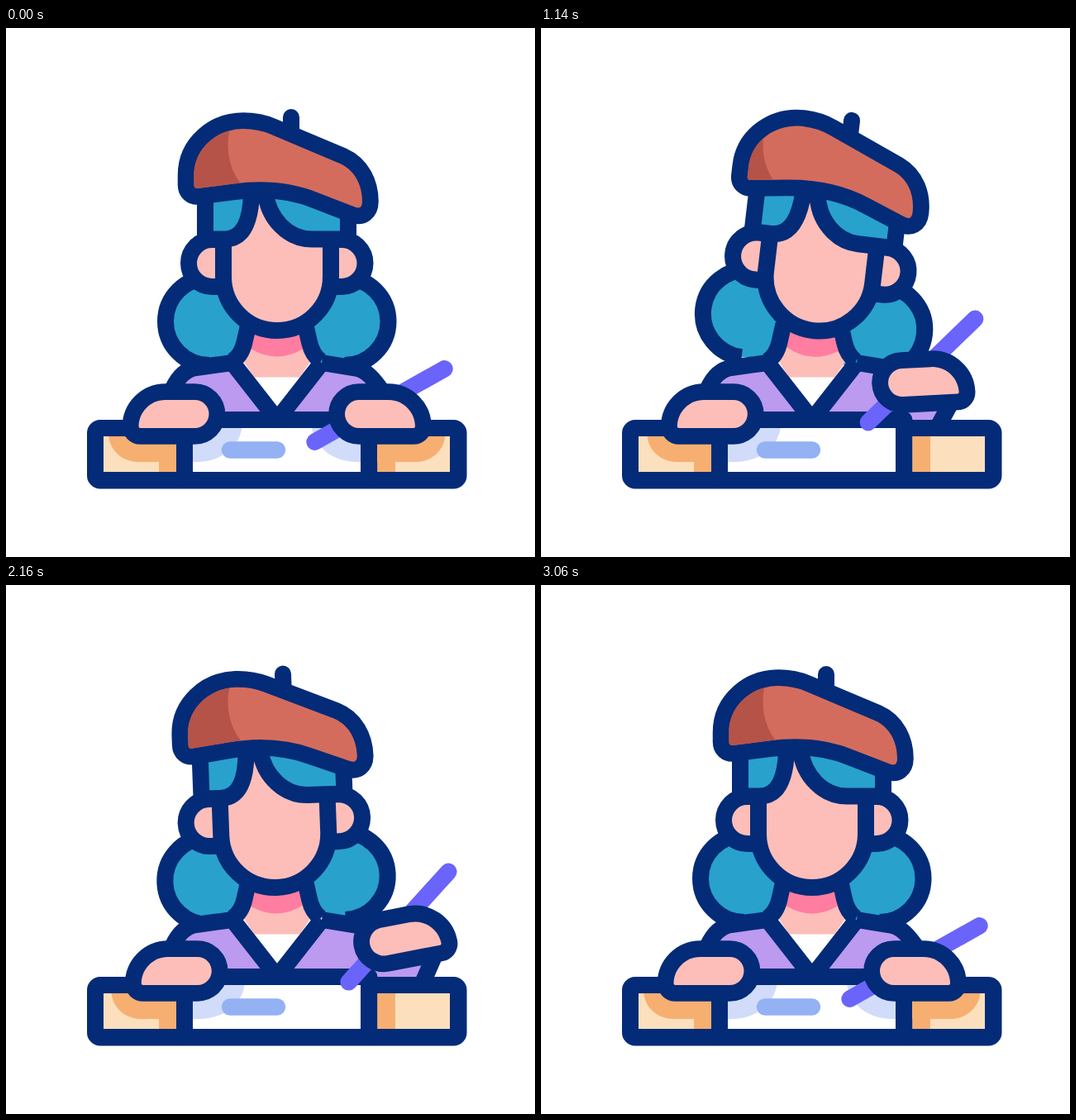
An HTML page for the animation above (3100 ms loop, 640 by 640 pixels).

```html
<!DOCTYPE html>
<html lang="en">
<head>
<meta charset="utf-8">
<title>Artist at the desk</title>
<style>
  html, body { margin: 0; width: 100%; height: 100%; overflow: hidden; background: #fff; }
  svg { display: block; width: 100vw; height: 100vh; }
  .ink { stroke: #042b77; stroke-width: 20; fill: none; stroke-linejoin: round; }
  .rim { stroke: #042b77; stroke-width: 39.5; fill: #042b77; stroke-linejoin: round; }
  .dark { fill: #042b77; }
  .skin { fill: #fdbeb9; }
  .hair { fill: #28a1cd; }
  .robe { fill: #bb9af0; }
  .wood { fill: #fce0bd; }
  .shade { fill: #f7af71; }
  .cast { fill: #d1dcfb; }
</style>
</head>
<body>
<svg viewBox="0 0 640 640">
  <defs>
    <path id="hatShape" d="M227.5 190V178C227.5 145 256 122 287 122Q305 122 320 128.500L404 164C422 172 431 190 431 210Q431 220 422 216.500L378 199.500Q332 181 275 188.500L232 194Q227.500 194.500 227.500 190Z"/>
    <path id="handShape" d="M427 450H463C481 450 495 465 495 482Q495 484 493 484H427A17 17 0 0 1 427 450Z"/>
    <path id="shadowShape" d="M124 470V490C124 510 140 525 160 525H230C262 525 286 505 286 476V470Z"/>
    <g id="hand"><use href="#handShape" class="rim"/><use href="#handShape" class="skin"/></g>
    <g id="bun">
      <path class="hair" d="M246 302A53 53 0 0 0 246 408L292 402V320Z"/>
      <path class="ink" d="M246 302A53 53 0 0 0 246 408"/>
    </g>
    <g id="ear">
      <path class="skin" d="M263 256H249.500a28.500 28.500 0 0 0 0 57H263Z"/>
      <path class="ink" d="M263 256H249.500a28.500 28.500 0 0 0 0 57H263"/>
    </g>
    <clipPath id="hatClip"><use id="hatClipShape" href="#hatShape"/></clipPath>
    <clipPath id="panelClip"><path d="M118 494H206V537H118ZM449 494H537V537H449Z"/></clipPath>
    <clipPath id="paperClip"><path d="M226 484H429V537H226Z"/></clipPath>
  </defs>

  <g class="head">
    <use href="#bun"/>
    <use href="#bun" transform="translate(655.5) scale(-1 1)"/>
  </g>

  <path class="skin" d="M294 350H361L368 404L350 430H305L288 404Z"/>
  <path class="head" fill="#ff7da1" d="M284 350H372V382L358 389Q328 406 298 389L284 382Z"/>
  <path fill="#fff" d="M295 422.500H361L328 470Z"/>
  <path class="robe" d="M328 474L274 405L230 411Q212 414 202 436L196 476Z"/>
  <path id="robeRight" class="robe"/>
  <path class="ink" d="M196 476L202 436Q212 414 230 411L274 405L328 474L382 405M293.500 358L288.500 380Q285 396 274 403M362 358L367 380Q370.500 396 381 403"/>
  <path id="sleeve" class="ink"/>

  <g class="head">
    <use href="#ear"/>
    <use href="#ear" transform="translate(655.5) scale(-1 1)"/>
    <path class="hair" d="M241 190H414V256H241Z"/>
    <path class="skin" d="M297 200C296 232 288 255.500 264 255.500H263V301a65 65 0 0 0 130 0V255.500H370C342 255.500 318 232 314 200Z"/>
    <path class="ink" d="M263 252V301a65 65 0 0 0 130 0V252"/>
    <path class="ink" d="M297 200C296 232 288 255.500 264 255.500H241V195M314 200C318 232 342 255.500 370 255.500H414V205"/>
    <path class="ink" stroke-linecap="round" d="M345 108V130"/>
    <use href="#hatShape" class="rim"/>
    <use href="#hatShape" fill="#d46c5d"/>
  </g>
  <path clip-path="url(#hatClip)" fill="#b55349" d="M150 90H284C262 125 263 168 290 195V240H150Z"/>

  <rect class="dark" x="98" y="474" width="459.500" height="83.500" rx="16"/>
  <rect class="dark" x="206" y="464" width="243.500" height="93" rx="10"/>
  <path class="wood" d="M118 494H206V537H118ZM449.500 494H537V537H449.500Z"/>
  <path class="shade" d="M185 494H206V537H185ZM449.500 494H471V537H449.500Z"/>
  <path fill="#fff" d="M226 484H429V537H226Z"/>
  <g class="shade" clip-path="url(#panelClip)">
    <use href="#shadowShape" class="leftCast"/><use href="#shadowShape" class="rightCast"/>
  </g>
  <g class="cast" clip-path="url(#paperClip)">
    <use href="#shadowShape" class="leftCast"/><use href="#shadowShape" class="rightCast"/>
  </g>
  <path stroke="#93b1f3" stroke-width="20.500" stroke-linecap="round" d="M271 510.500H328"/>

  <path id="pen" stroke="#6a64fb" stroke-width="20.500" stroke-linecap="round" d="M-90 0H90"/>
  <g id="leftHand"><use href="#hand" transform="translate(655.5) scale(-1 1)"/></g>
  <use id="rightHand" href="#hand"/>
  <g id="sparks" stroke="#fdd87c" stroke-width="20.500" stroke-linecap="round"></g>
</svg>
<script>
  const LOOP = 3100;
  const $ = id => document.getElementById(id);
  const all = (selector, name, value) =>
    document.querySelectorAll(selector).forEach(el => el.setAttribute(name, value));

  // time, head tilt, hand x, y, tilt, pen x, y, tilt
  const poses = [
    [0, 0, 427, 467, 0, 452, 456.5, -29.4],
    [630, -7, 466, 406, -15, 481, 383, -52.5],
    [740, -6, 464, 410, -14, 479, 386.5, -51.5],
    [1140, 6.7, 437, 429, -3, 460.5, 414.5, -44.1],
    [1780, -3.85, 466.5, 431, -14, 480, 408.5, -52.4],
    [1890, -4.1, 473, 429, -15, 484, 406, -53],
    [2160, -2.15, 457, 431.5, -11, 475, 413.5, -47.9],
    [2720, 2.4, 434, 448.5, 0, 458, 436.5, -37.1],
    [3060, 0, 427, 467, 0, 452, 456.5, -29.4]
  ];

  // start and end of each spark's flight
  const sparks = [[521, 281, 531, 241], [573, 279, 602, 250], [576, 322, 618, 317]].map(ends => {
    const el = document.createElementNS("http://www.w3.org/2000/svg", "line");
    $("sparks").append(el);
    return { el, ends };
  });

  const slope = (i, c) => (poses[i + 1][c] - poses[i][c]) / (poses[i + 1][0] - poses[i][0]);

  // Monotone tangent: flat at turning points
  function tangent(i, c) {
    if (i === 0 || i === poses.length - 1) return 0;
    const a = slope(i - 1, c), b = slope(i, c);
    return a * b <= 0 ? 0 : 2 * a * b / (a + b);
  }

  function poseAt(t) {
    const last = poses.length - 1;
    if (t >= poses[last][0]) return poses[last].slice(1);
    const i = poses.findIndex((p, k) => t < poses[k + 1][0]);
    const span = poses[i + 1][0] - poses[i][0];
    const u = (t - poses[i][0]) / span, v = 1 - u;
    return poses[i].slice(1).map((from, k) => {
      const c = k + 1;
      return from * v * v * (1 + 2 * u) + poses[i + 1][c] * u * u * (3 - 2 * u)
        + span * u * v * (v * tangent(i, c) - u * tangent(i + 1, c));
    });
  }

  function easeOut(t, start, end) {
    const p = Math.min(1, Math.max(0, (t - start) / (end - start)));
    return 1 - (1 - p) ** 2;
  }

  function drawSparks(t) {
    const head = easeOut(t, 440, 780), tail = easeOut(t, 500, 920);
    $("sparks").setAttribute("visibility", t > 440 && t < 890 ? "visible" : "hidden");
    for (const { el, ends: [x1, y1, x2, y2] } of sparks) {
      const at = (a, b, p) => a + (b - a) * p;
      el.setAttribute("x1", at(x1, x2, tail));
      el.setAttribute("y1", at(y1, y2, tail));
      el.setAttribute("x2", at(x1, x2, head));
      el.setAttribute("y2", at(y1, y2, head));
    }
  }

  function draw(t) {
    const [tilt, hx, hy, turn, px, py, penTurn] = poseAt(t);

    const headTurn = `rotate(${tilt} 328 375)`;
    all(".head", "transform", headTurn);
    $("hatClipShape").setAttribute("transform", headTurn);

    const slide = 2.55 * (1 - Math.cos(2 * Math.PI * Math.min(t, 3060) / 3060));
    $("leftHand").setAttribute("transform", `translate(${slide})`);
    all(".leftCast", "transform", `translate(${slide})`);

    const place = y => `translate(${hx} ${y}) rotate(${turn}) translate(-427 -467)`;
    $("rightHand").setAttribute("transform", place(hy));
    all(".rightCast", "transform", place(467 + (hy - 467) * 1.08) + " translate(655.5) scale(-1 1)");
    $("pen").setAttribute("transform", `translate(${px} ${py}) rotate(${penTurn})`);

    // The elbow hangs below the outer end of the hand
    const a = turn * Math.PI / 180;
    const ex = hx + 56 * Math.cos(a) - 30 * Math.sin(a);
    const ey = hy + 56 * Math.sin(a) + 30 * Math.cos(a);
    const arm = `M382 405L425 412Q452 418 ${ex} ${ey}L${ex - 13} ${Math.max(480, ey)}`;
    $("sleeve").setAttribute("d", arm);
    $("robeRight").setAttribute("d", arm + "L328 480V474Z");

    drawSparks(t);
  }

  const start = performance.now();
  function tick() {
    draw((performance.now() - start) % LOOP);
    requestAnimationFrame(tick);
  }
  tick();
</script>
</body>
</html>
```
